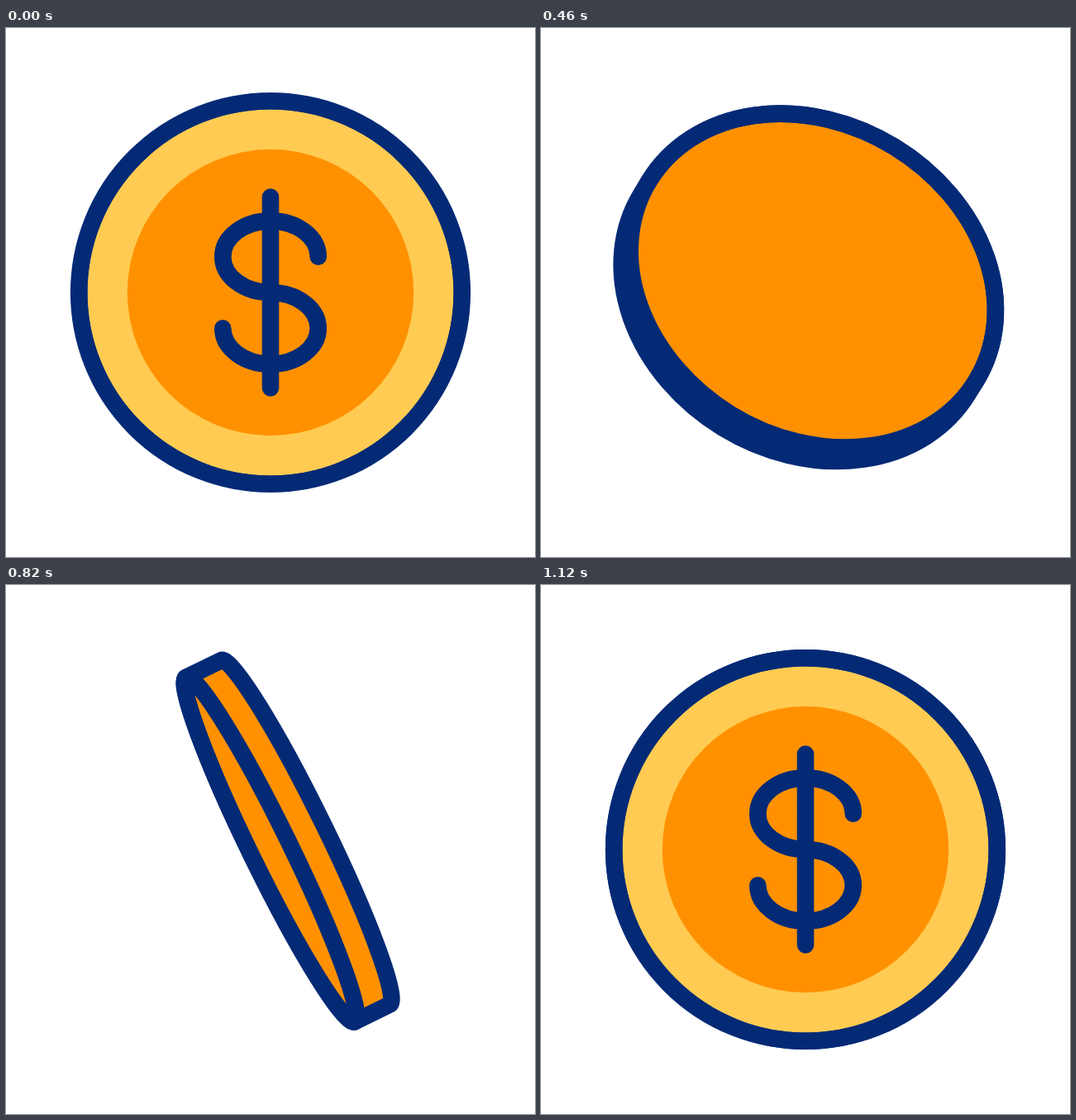
Write an HTML page with a canvas that moves like this. It is 640 px wide and 640 px high and loops after 1400 ms.

```html
<!DOCTYPE html>
<html lang="en">
<head>
<meta charset="utf-8">
<title>Spinning coin</title>
<style>
  html, body { margin: 0; width: 100%; height: 100%; overflow: hidden; background: #fff; }
  canvas { display: block; width: 640px; height: 640px; }
</style>
</head>
<body>
<canvas id="stage" width="640" height="640"></canvas>
<script>
const ctx = document.getElementById('stage').getContext('2d');
const NAVY = '#042a76', ORANGE = '#ff9100', YELLOW = '#ffcb52';
const LOOP = 1400, STEP = 20, SPIN_END = 1120;
const R = 231.8, CORE = 173.2, UNIT = 14.43;
const HALF = Math.PI / 2;

// Pose keys: spin and tilt in degrees, face offsets along the coin axis in pixels.
const times = [0, 160, 280, 340, 560, 620, 820, 900, 1120];
const spin  = [0, 53.4, 88.5, 105.2, 180, 201.5, 264.1, 288, 360];
const tilt  = [0, 17.1, 40, 51.2, 61, 55.7, 26.1, 14.3, 0];
const front = [0, 0, -2, -3.5, 0, 5.7, 47, 29.5, 0];
const back  = [0, 20, 43, 41.5, 0, 0, 0, -8.3, 0];

// Monotone cubic interpolation: smooth, without overshoot.
function sample(values, t) {
  const last = times.length - 2;
  const slope = i => (values[i + 1] - values[i]) / (times[i + 1] - times[i]);
  const tangent = i => {
    if (i === 0) return slope(0);
    if (i > last) return slope(last);
    const a = slope(i - 1), b = slope(i);
    return a * b <= 0 ? 0 : 2 * a * b / (a + b);
  };
  let i = 0;
  while (i < last && t >= times[i + 1]) i++;
  const h = times[i + 1] - times[i], p = (t - times[i]) / h, q = 1 - p;
  return values[i] * q * q * (1 + 2 * p) + values[i + 1] * p * p * (1 + 2 * q)
    + h * p * q * (tangent(i) * q - tangent(i + 1) * p);
}

function disc(x, radius, squash) {
  ctx.beginPath();
  ctx.ellipse(x, 0, radius * squash, radius, 0, 0, 4 * HALF);
}

function fill(color) {
  ctx.fillStyle = color;
  ctx.fill();
}

function hull(x1, x2, squash) {
  ctx.beginPath();
  ctx.ellipse(Math.max(x1, x2), 0, R * squash, R, 0, -HALF, HALF);
  ctx.ellipse(Math.min(x1, x2), 0, R * squash, R, 0, HALF, 3 * HALF);
  ctx.closePath();
}

function dollar(x, squash) {
  const rx = 4 * UNIT * squash, ry = 3 * UNIT;
  ctx.beginPath();
  ctx.moveTo(x, -8 * UNIT);
  ctx.lineTo(x, 8 * UNIT);
  ctx.moveTo(x + rx, -ry);
  ctx.ellipse(x, -ry, rx, ry, 0, 0, HALF, true);
  ctx.ellipse(x, ry, rx, ry, 0, -HALF, 2 * HALF);
  ctx.stroke();
}

function draw(t) {
  const [angle, lean, frontX, backX] = [spin, tilt, front, back].map(v => sample(v, t));
  const facing = Math.cos(angle * Math.PI / 180);
  const squash = Math.abs(facing);
  const showFront = facing > 0;
  const faceX = showFront ? frontX : backX;

  ctx.setTransform(1, 0, 0, 1, 0, 0);
  ctx.clearRect(0, 0, 640, 640);
  ctx.translate(320, 320);
  ctx.rotate(-lean * Math.PI / 180);
  ctx.strokeStyle = NAVY;
  ctx.lineWidth = 20.6;
  ctx.lineCap = ctx.lineJoin = 'round';

  hull(frontX, backX, squash);
  fill(ORANGE);

  ctx.save();
  disc(faceX, R, squash);
  fill(showFront ? YELLOW : ORANGE);
  // On the first quarter turn the rim covers the outer half of the face line.
  if (showFront && angle < 90) ctx.clip();
  ctx.stroke();
  ctx.restore();

  hull(frontX, backX, squash);
  ctx.stroke();

  if (showFront) {
    disc(faceX, CORE, squash);
    fill(ORANGE);
    dollar(faceX, squash);
  }
}

const start = performance.now();
function frame() {
  const t = (performance.now() - start) % LOOP;
  draw(Math.min(Math.floor(t / STEP) * STEP, SPIN_END));
  requestAnimationFrame(frame);
}
frame();
</script>
</body>
</html>
```
